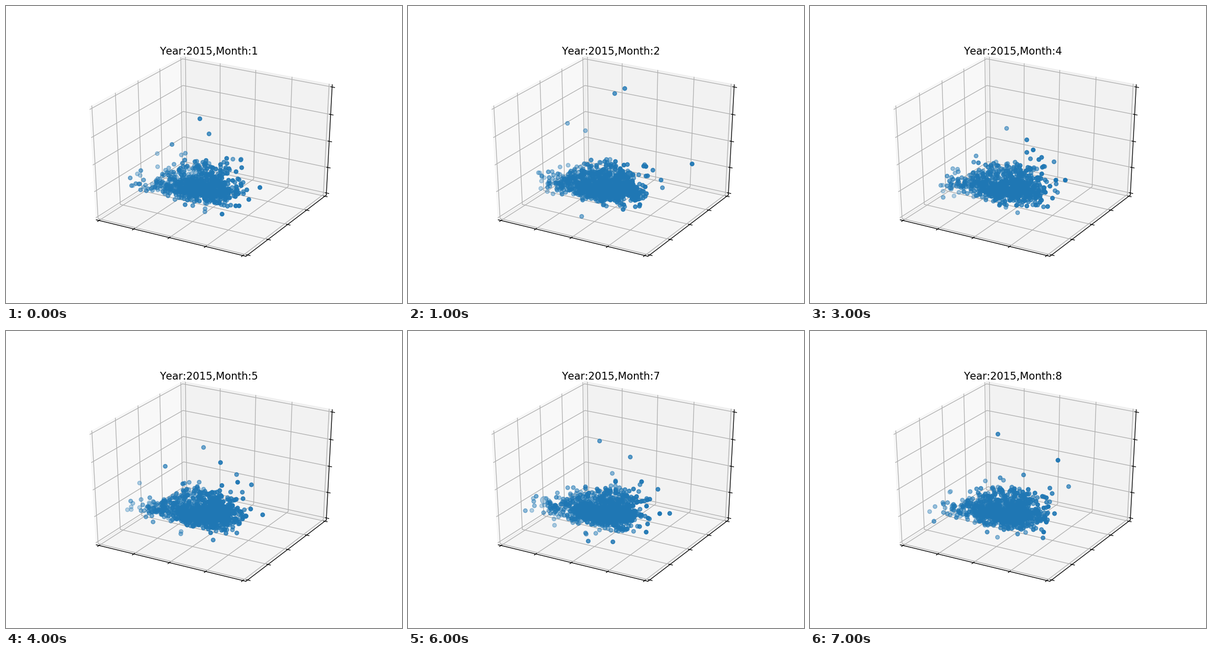
Animation of 864x648 px, one loop 8000 ms. Source, as a matplotlib script:

```python
import numpy as np
import matplotlib.pyplot as plt
from matplotlib.animation import FuncAnimation
from matplotlib.patches import Polygon

W, H, DPI = 864, 648, 135
BLUE = (0x1F / 255, 0x77 / 255, 0xB4 / 255)
PT = DPI / 72                # pixels per point
DOT = 10.26                  # outer diameter of a normal marker
EDGE = 0.5 + 1 / 48          # the box reaches a little past the data
TICKS = np.linspace(-0.5, 0.5, 5)

plt.rcParams["text.kerning_factor"] = 6
fig = plt.figure(figsize=(W / DPI, H / DPI), dpi=DPI, facecolor="white")
ax = fig.add_axes([0, 0, 1, 1])
ax.set_xlim(0, W)
ax.set_ylim(H, 0)
ax.axis("off")


def project(points, elev=30, azim=-60, dist=10):
    """Perspective view of points in a unit cube centred on the origin."""
    e, a = np.radians([elev, azim])
    n = np.array([np.cos(e) * np.cos(a), np.cos(e) * np.sin(a), np.sin(e)])
    u = np.array([-np.sin(a), np.cos(a), 0])
    v = np.cross(n, u)
    p = np.asarray(points, float)
    depth = dist - p @ n
    lo, span = 0.95 / dist, 1.85 / dist
    x = W * (0.125 + 0.775 * (p @ u / depth + lo) / span)
    y = H * (0.89 - 0.77 * (p @ v / depth + lo) / span)
    return np.column_stack([x, y])


def line(points, color, z):
    ax.plot(*project(points).T, color=color, lw=0.8, zorder=z)


def pane(axis, side, grey):
    ring = []
    for s, t in [(-1, -1), (1, -1), (1, 1), (-1, 1)]:
        corner = [s * EDGE, t * EDGE]
        corner.insert(axis, side * EDGE)
        ring.append(corner)
    tone = (grey, grey, grey, 0.5)
    ax.add_patch(Polygon(project(ring), facecolor=tone, edgecolor=tone,
                         lw=1, zorder=1))


def grid(axis):
    for loc in TICKS:
        mid = [-EDGE, EDGE, -EDGE]
        mid[axis] = loc
        a, b = list(mid), list(mid)
        a[(axis + 1) % 3] *= -1
        b[(axis + 2) % 3] *= -1
        line([a, mid, b], "#b0b0b0", 2)


def axis_line(axis, base, tick_axis, outward):
    start, end = list(base), list(base)
    start[axis], end[axis] = -EDGE, EDGE
    line([start, end], "black", 3)
    for loc in TICKS:
        a = list(base)
        a[axis] = loc
        b = list(a)
        a[tick_axis] += outward * 0.2 / 12
        b[tick_axis] -= outward * 0.1 / 12
        line([a, b], "black", 4)


pane(0, -1, 0.95)
pane(1, 1, 0.90)
pane(2, -1, 0.925)
for k in range(3):
    grid(k)
axis_line(0, (0, -EDGE, -EDGE), 1, -1)
axis_line(1, (EDGE, 0, -EDGE), 0, 1)
axis_line(2, (EDGE, EDGE, 0), 0, 1)

# Dense parts: weight, centre x, centre y, spread x, spread y, slope
BLOBS = [
    (0.51, 449, 401, 30, 15, 0.06),
    (0.28, 388, 396, 25, 13, 0.15),
    (0.06, 328, 387, 18, 11, 0.10),
    (0.10, 450, 364, 27, 11, 0.10),
    (0.05, 385, 363, 24, 9, -0.10),
]

# Per month: size of the cloud, then its most remote points
MONTHS = [
    (800, [(423, 246), (443, 279), (330, 322), (554, 396), (434, 449)]),
    (950, [(473, 180), (451, 191), (348, 256), (387, 272), (379, 459)]),
    (1600, [(462, 172), (471, 241), (491, 253), (382, 257), (578, 382)]),
    (800, [(429, 267), (473, 292), (487, 314), (557, 380), (453, 451)]),
    (1000, [(431, 254), (468, 287), (265, 390), (560, 401), (452, 456)]),
    (1200, [(444, 231), (432, 237), (436, 267), (557, 416), (461, 451)]),
    (1000, [(418, 240), (485, 275), (256, 392), (571, 398), (447, 460)]),
    (950, [(410, 225), (541, 282), (466, 314), (261, 394), (453, 443)]),
]


def cloud(rng, count):
    parts = []
    for weight, cx, cy, sx, sy, slope in BLOBS:
        p = rng.normal(size=(int(weight * count), 2))
        dx, dy = p[np.hypot(*p.T) < 2.4].T * [[sx], [sy]]
        parts.append(np.column_stack([cx + dx, cy + dy + slope * dx]))
    return np.vstack(parts)


def strays(rng, count):
    """Loose points above, left, right and below the cloud."""
    above = rng.normal(425, 55, 2 * count), 352 - rng.exponential(13, 2 * count)
    left = rng.uniform(270, 330, count), rng.normal(385, 17, count)
    right = 512 + rng.exponential(11, count), rng.normal(395, 22, count)
    below = rng.uniform(380, 510, count), 432 + rng.exponential(5, count)
    return np.hstack([above, left, right, below]).T


def month_points(i):
    rng = np.random.default_rng(i + 1)
    count, remote = MONTHS[i]
    core = rng.permutation(cloud(rng, count))
    xy = np.vstack([core, strays(rng, 6 + count // 250), remote])
    x = xy[:, 0]
    alpha = rng.uniform(0.45, 0.85, len(x)) + (x - 420) / 600
    size = np.full(len(x), DOT)
    # a few larger bubbles, mostly on the far left
    if i > 0:
        big = rng.random(len(x)) < np.where(x < 320, 0.07, 0.002)
        size[big] = rng.uniform(12, 20, big.sum())
    rgba = np.column_stack([np.tile(BLUE, (len(x), 1)), alpha.clip(0.3, 1)])
    return xy, (size / PT - 1) ** 2, rgba


dots = ax.scatter([], [], lw=1, zorder=5)
title = ax.text(W * 0.5125, H * 0.1816 - 6 * PT, "", fontsize=12,
                family="DejaVu Sans", ha="center", va="baseline", zorder=6)


def update(i):
    xy, sizes, rgba = month_points(i)
    dots.set_offsets(xy)
    dots.set_sizes(sizes, DPI)
    dots.set_facecolor(rgba)
    dots.set_edgecolor(rgba)
    title.set_text(f"Year:2015,Month:{i + 1}")
    return dots, title


anim = FuncAnimation(fig, update, frames=len(MONTHS), interval=1000, repeat=True)
plt.show()
```
